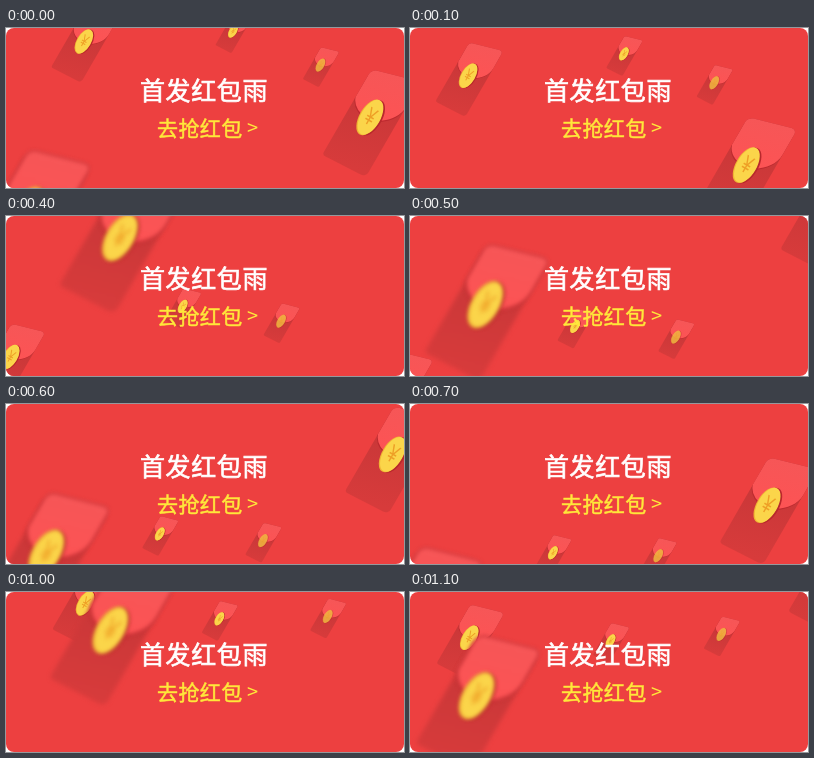
An HTML page with a canvas that plays this animation: 398 px wide and 160 px high, repeating every 1200 ms.

```html
<!DOCTYPE html>
<html lang="zh-CN">
<head>
<meta charset="utf-8">
<title>红包雨</title>
<style>
  html, body { margin: 0; width: 100%; height: 100%; overflow: hidden; background: #fff; }
  #stage { position: relative; width: 398px; height: 160px; overflow: hidden; border-radius: 8px; background: #ed4040; }
  canvas { position: absolute; left: 0; top: 0; }
  .line { position: absolute; white-space: pre; font-family: "Noto Sans CJK SC", "Noto Sans CJK", "Noto Sans", sans-serif; }
  #title { left: 134px; top: 41px; font-size: 25px; line-height: 40px; letter-spacing: .6px; color: #fff; -webkit-text-stroke: .7px #fff; }
  #action { left: 151px; top: 84px; font-size: 21px; line-height: 30px; letter-spacing: .4px; color: #ffe83a; -webkit-text-stroke: .5px #ffe83a; }
  #arrow { left: 241px; top: 84px; font-size: 20px; line-height: 30px; color: #ffe83a; }
</style>
</head>
<body>
<div id="stage">
  <canvas id="rain" width="398" height="160"></canvas>
  <div class="line" id="title">首发红包雨</div>
  <div class="line" id="action">去抢红包</div>
  <div class="line" id="arrow">&gt;</div>
</div>
<script>
const ctx = document.getElementById('rain').getContext('2d');
const LOOP = 1200, STEP = 100;
const WIDTH = 35, LENGTH = 72, COIN_X = 16.5, COIN_Y = 33.5;
const TILT = 14 * Math.PI / 180, LEAN = 30 * Math.PI / 180;

// x: where the lane crosses the top; speed: px per 100 ms; starts: entry times in ms
const lanes = [
  { x: 336, scale: .54, speed: 19, blur: .4, alpha: .5, starts: [-255, 815] },
  { x: 229, scale: .54, speed: 23.5, blur: 0, alpha: 1, starts: [-56, 840] },
  { x: 86, scale: 1, speed: 36, blur: 0, alpha: 1, starts: [-66, 940] },
  { x: 416, scale: 1.45, speed: 57, blur: 0, alpha: 1, starts: [-186, 490, 1114] },
  { x: 127, scale: 1.85, speed: 73, blur: 2, alpha: 1, starts: [-304, 356, 932] }
];

// Fall slows slightly with distance
function fall(speed, ms) {
  const d = speed * ms / 100;
  return d - .0006 * d * d - 10;
}

function shade(top, bottom, from, to) {
  const g = ctx.createLinearGradient(0, top, 0, bottom);
  g.addColorStop(0, from);
  g.addColorStop(1, to);
  return g;
}

function drawBody() {
  ctx.fillStyle = shade(18, LENGTH, '#c83738', '#d73b3b');
  ctx.beginPath();
  ctx.moveTo(0, 5);
  ctx.lineTo(WIDTH, 5);
  ctx.arcTo(WIDTH, LENGTH + 4, 0, LENGTH - 4, 3);
  ctx.arcTo(0, LENGTH - 4, 0, 5, 3);
  ctx.closePath();
  ctx.fill();
}

function drawFlap(drop, color) {
  ctx.fillStyle = color;
  ctx.beginPath();
  ctx.moveTo(0, 22 + drop);
  ctx.arcTo(0, 0, WIDTH, 0, 4);
  ctx.arcTo(WIDTH, 0, WIDTH, 20, 4);
  ctx.lineTo(WIDTH, 20 + drop);
  ctx.bezierCurveTo(WIDTH, 31 + drop, 24, 36 + drop, 15, 35 + drop);
  ctx.quadraticCurveTo(3, 31 + drop, 0, 22 + drop);
  ctx.fill();
}

function drawCoin() {
  const disc = (x, y, rx, ry, color) => {
    ctx.fillStyle = color;
    ctx.beginPath();
    ctx.ellipse(x, y, rx, ry, 0, 0, 7);
    ctx.fill();
  };
  ctx.rotate(LEAN);
  disc(1, -.2, 7, 13.6, '#b8282c');
  disc(-.5, .4, 7, 13.6, '#f0b434');
  disc(0, 0, 6.8, 13.3, '#fbd54a');
  ctx.scale(.8, 1.25);
  ctx.fillStyle = '#ee9f26';
  ctx.font = '14px "Liberation Sans", Arial, sans-serif';
  ctx.textAlign = 'center';
  ctx.textBaseline = 'middle';
  ctx.fillText('¥', 0, .5);
}

function drawEnvelope({ scale, blur, alpha }, x, y) {
  ctx.save();
  ctx.filter = blur ? `blur(${blur}px)` : 'none';
  ctx.translate(x, y);
  ctx.scale(scale, scale);
  ctx.save();
  ctx.transform(Math.cos(TILT), Math.sin(TILT), -Math.sin(LEAN), Math.cos(LEAN), 0, 0);
  ctx.translate(-COIN_X, -COIN_Y);
  drawBody();
  drawFlap(1, '#bd2a2f');
  drawFlap(0, shade(0, 34, '#f65657', '#fd5354'));
  ctx.restore();
  ctx.globalAlpha = alpha;
  drawCoin();
  ctx.restore();
}

function frame(now) {
  const t = Math.floor((now % LOOP) / STEP) * STEP;
  ctx.clearRect(0, 0, 398, 160);
  for (const lane of lanes) {
    for (const start of lane.starts) {
      const y = fall(lane.speed, t - start);
      if (t - start > -150 && y < 240) drawEnvelope(lane, lane.x - y * Math.tan(LEAN), y);
    }
  }
  requestAnimationFrame(frame);
}
frame(performance.now());
</script>
</body>
</html>
```
